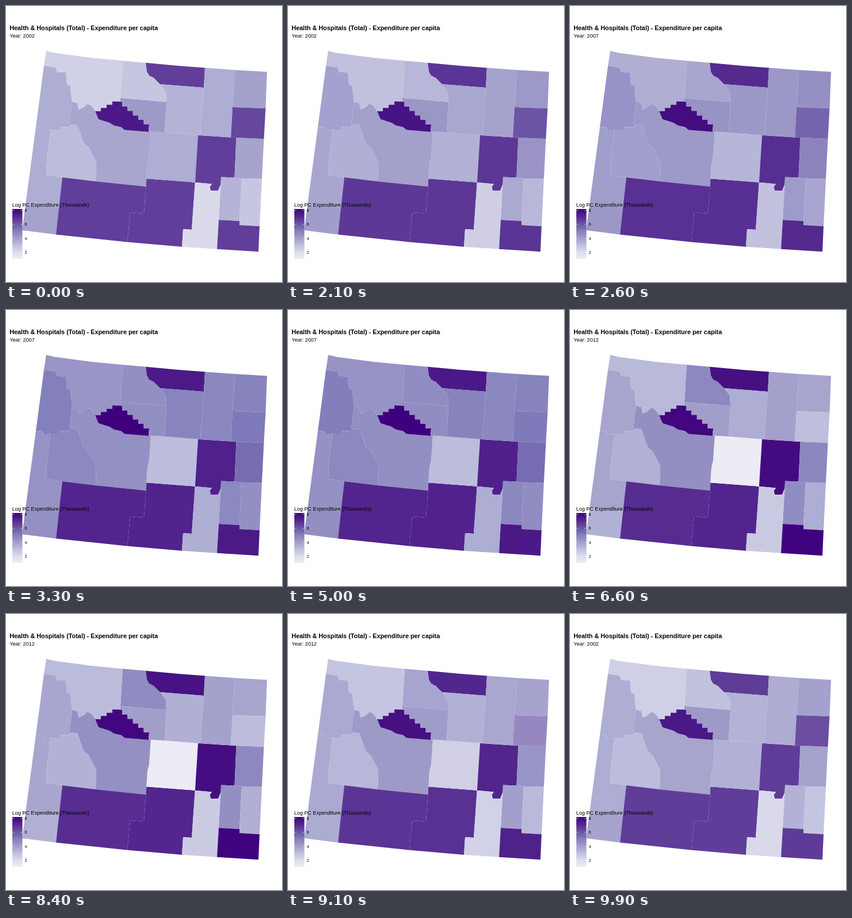
These frames come from a looping animation (480 by 480 pixels, 10 s). An HTML page:

```html
<!DOCTYPE html>
<html lang="en">
<head>
<meta charset="utf-8">
<title>Expenditure per capita</title>
<style>
  html, body { margin: 0; width: 100%; height: 100%; overflow: hidden; background: #fff; }
  svg { display: block; width: 100vw; height: 100vh; }
  text { font-family: "Liberation Sans", Arial, sans-serif; fill: #000; }
</style>
</head>
<body>
<svg viewBox="0 0 480 480">
  <defs><linearGradient id="ramp" x1="0" y1="1" x2="0" y2="0"></linearGradient></defs>
  <g id="map"></g>
  <text x="6.2" y="42" font-size="10.87" font-weight="bold">Health &amp; Hospitals (Total) - Expenditure per capita</text>
  <text id="year" x="6.2" y="55" font-size="9.1"></text>
  <text x="10.8" y="349" font-size="9.03">Log PC Expenditure (Thousands)</text>
  <rect x="11" y="353" width="17.5" height="87" fill="url(#ramp)"/>
  <g id="scale"></g>
</svg>
<script>
const NS = 'http://www.w3.org/2000/svg';
const $ = id => document.getElementById(id);

function add(parent, tag, attrs, text) {
  const el = document.createElementNS(NS, tag);
  for (const k in attrs) el.setAttribute(k, attrs[k]);
  if (text) el.textContent = text;
  return parent.appendChild(el);
}

const mix = (a, b, p) => a.map((v, i) => v + (b[i] - v) * p);

// Shared corners, row by row from the north, each from west to east
const corners = {};
Object.entries({
  a: '70,78 84,81.5 150,90.3 203,95.3 243,98.7 300,104 346,107.5 398,111.3 454,114.5',
  b: '66,104 115,167 155,183 199,160 268,136 279,167 344,142 394,176 451.5,178 199,166.3',
  c: '52,210 77.5,215 110,206 248,219 252,218.5 276,220 334,224.7 338,225 391,228.5 400.5,229 448.5,231',
  d: '70,294 98,298 156,305 243.5,314 244.3,300.3 328.8,306.8 373.5,310 374,297.5 397.5,298.5 410,299.8 445,300.5',
  e: '34,345 93,350 216,359 240,361 370,372 406,374 406,381 441,383',
  f: '28,390 87,397.4 211,410.6 306,418.8 308,388 323,389 367,422.7 439,427.2'
}).forEach(([row, spec]) => spec.split(' ').forEach((p, i) => {
  corners[row + i] = p.split(',').map(Number);
}));

const line = spec => spec.split(' ').map(s => corners[s] || s.split(',').map(Number));

function stairs(spec, n, down) {
  const [from, to] = line(spec);
  const points = [from];
  for (let i = 0; i < n; i++) {
    const [x, y] = mix(from, to, i / n), next = mix(from, to, (i + 1) / n);
    points.push(down ? [x, next[1]] : [next[0], y], next);
  }
  return points;
}

// Winding borders between neighbours
const borders = {
  A: line('b0 86,107 89,115 104,115.5 106,137 112,139 113,153 b1'),
  B: line('b1 124,169 126,180 134,177 142,170 149,174 b2'),
  C: [...stairs('b2 185,166', 3), corners.b9],
  D: [corners.b9, ...stairs('202,166.5 249,206', 5, true), corners.c3],
  E: line('b2 161,197 180,203 188,208 200,210.5 206,215.5 c3'),
  F: line('c0 64,211 65,217.5 c1'),
  G: stairs('c1 c2', 2),
  H: line('c2 124,207 135,238 144,246 157,271 d2'),
  I: line('c1 71,268 d0 d1'),
  J: line('a4 245,114 249,121 257,125 b4'),
  K: line('b4 278,149 b5'),
  L: line('c4 249,262 246,274 d4'),
  N: line('d5 358,309.5 354.5,314.5 356,321 369,321 d6'),
  O: line('d3 e3 e2 f2')
};

// Outline (capital: border, ~ reverses it), then percent of the ramp in each year
const regions = [
  ['A B C b3 a3 a2 a1 a0', '19 46 29.5'],
  ['A c2 ~G ~F', '35 56 38'],
  ['F I e1 e0', '35 47 38'],
  ['e0 e1 f1 f0', '39.5 48 33'],
  ['G H d1 ~I', '28.5 51.5 33'],
  ['B E L d3 d2 ~H', '38 48 48'],
  ['C D ~E', '92 100 98'],
  ['d1 d2 O f1', '78 87 84'],
  ['d4 d5 f5 f4 f3 ~O', '78 88 87'],
  ['L d5 c6 c5', '35 28.5 0'],
  ['c6 c7 c8 c9 d8 d7 ~N', '78 89 97'],
  ['N e4 f6 f3 f4 f5', '14 35 22'],
  ['d7 d8 d9 e5 e4 d6', '32 52 49'],
  ['d9 d10 e7 e6 e5', '24 49 34.5'],
  ['c9 c10 d10 d9 d8', '39 63 51.5'],
  ['e4 e5 e6 e7 f7 f6', '78 92 100'],
  ['a3 J K b3', '24 49 51'],
  ['J b6 a6 a5', '78 92 95.5'],
  ['K c5 c6 c7 b6', '32.5 54 34.5'],
  ['D c4 c5 b5 b3', '43 49 41'],
  ['a6 a7 b7 c8 c7 b6', '35 52 40'],
  ['a7 a8 b8 b7', '40 54 38'],
  ['b7 b8 c10 c9 c8', '75 58 26.5']
];

const outline = spec => spec.split(' ').flatMap(s =>
  s[0] === '~' ? [...borders[s[1]]].reverse() : borders[s] || [corners[s]]).join(' ');

// Colours blend in CIE Lab
const white = [0.9505, 1, 1.089];

function toLab(hex) {
  const [r, g, b] = [1, 3, 5].map(i => {
    const c = parseInt(hex.slice(i, i + 2), 16) / 255;
    return c > 0.04045 ? ((c + 0.055) / 1.055) ** 2.4 : c / 12.92;
  });
  const [x, y, z] = [
    0.4124 * r + 0.3576 * g + 0.1805 * b,
    0.2126 * r + 0.7152 * g + 0.0722 * b,
    0.0193 * r + 0.1192 * g + 0.9505 * b
  ].map((v, i) => {
    v /= white[i];
    return v > 0.008856 ? Math.cbrt(v) : 7.787 * v + 16 / 116;
  });
  return [116 * y - 16, 500 * (x - y), 200 * (y - z)];
}

function toRgb([l, a, b]) {
  const fy = (l + 16) / 116;
  const [x, y, z] = [fy + a / 500, fy, fy - b / 200].map((v, i) =>
    white[i] * (v > 0.2069 ? v ** 3 : (v - 16 / 116) / 7.787));
  const rgb = [
    3.2406 * x - 1.5372 * y - 0.4986 * z,
    -0.9689 * x + 1.8758 * y + 0.0415 * z,
    0.0557 * x - 0.204 * y + 1.057 * z
  ].map(c => {
    c = Math.min(1, Math.max(0, c));
    return Math.round(255 * (c > 0.0031308 ? 1.055 * c ** (1 / 2.4) - 0.055 : 12.92 * c));
  });
  return `rgb(${rgb})`;
}

const purples = '#efedf5 #dadaeb #bcbddc #9e9ac8 #807dba #6a51a3 #54278f #3f007d'.split(' ');
const stops = purples.map(toLab);

function ramp(percent) {
  const at = percent / 100 * (stops.length - 1);
  const i = Math.min(Math.floor(at), stops.length - 2);
  return mix(stops[i], stops[i + 1], at - i);
}

purples.forEach((c, i) =>
  add($('ramp'), 'stop', { offset: i / (purples.length - 1), 'stop-color': c }));

for (let v = 2; v <= 8; v += 2) {
  const y = 452.6 - 12.15 * v;
  add($('scale'), 'path', { d: `M11 ${y}h3.5M25 ${y}h3.5`, stroke: '#fff', 'stroke-width': 0.5 });
  add($('scale'), 'text', { x: 32.5, y: y + 2.6, 'font-size': 7.2 }, String(v));
}

const shapes = regions.map(([spec, levels]) => ({
  el: add($('map'), 'polygon', { points: outline(spec) }),
  labs: levels.split(' ').map(ramp)
}));

// Each third of the loop holds one year, then blends to the next
const LOOP = 10000, STEP = 100;

function draw(ms) {
  const frame = Math.floor(ms % LOOP / STEP);
  const phase = frame * 3 / (LOOP / STEP);
  const from = Math.floor(phase), to = (from + 1) % 3;
  const p = Math.max(0, (phase - from) * 2 - 1);
  for (const { el, labs } of shapes) el.setAttribute('fill', toRgb(mix(labs[from], labs[to], p)));
  $('year').textContent = 'Year: ' + (2002 + 5 * (p > 0.5 ? to : from));
}

const start = performance.now();
function tick() {
  draw(performance.now() - start);
  requestAnimationFrame(tick);
}
tick();
</script>
</body>
</html>
```
